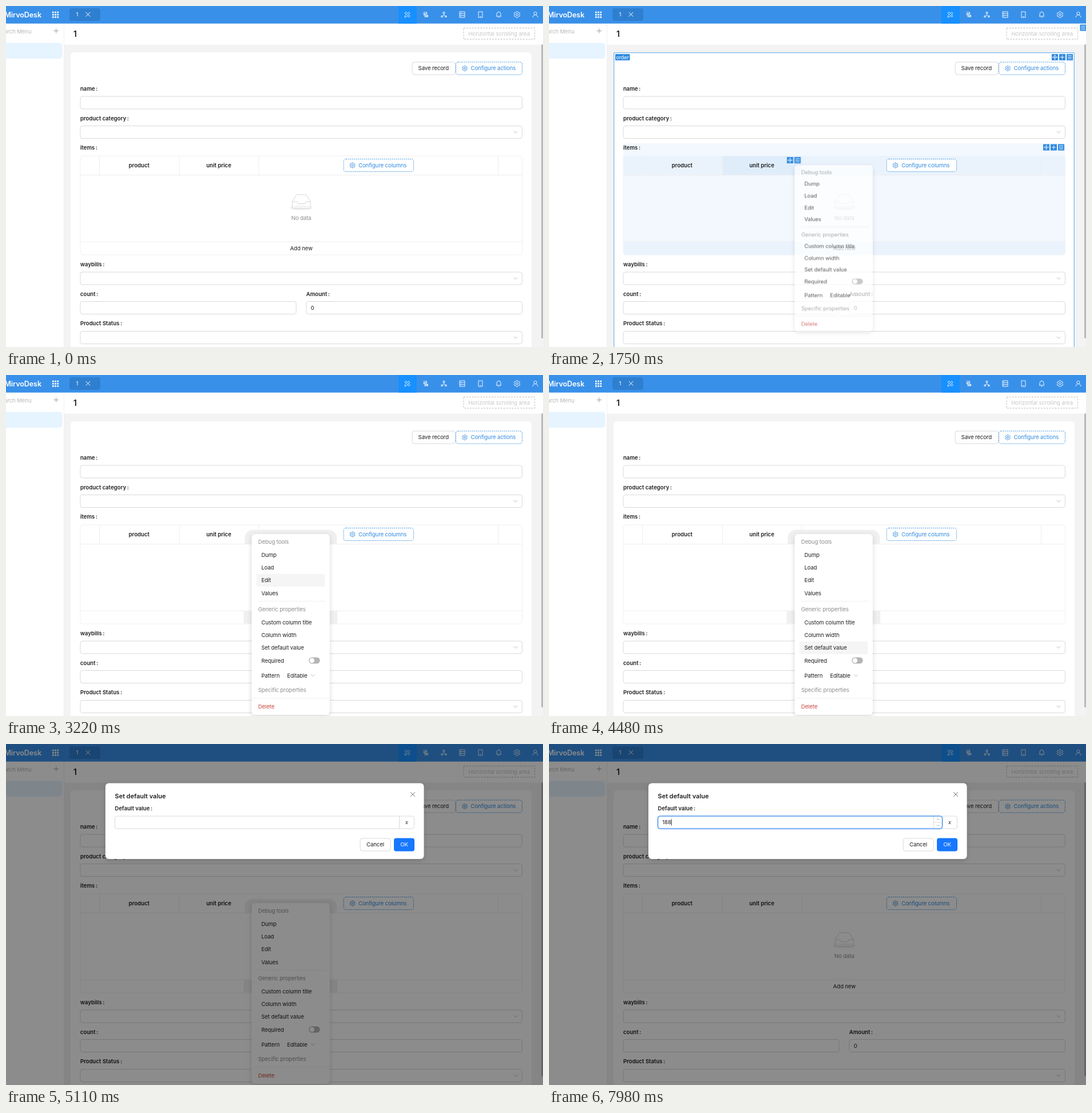
Recreate the animation shown at these times as an HTML page. Size 940 px wide and 596 px high, loop 8 s.

```html
<!DOCTYPE html>
<html lang="en">
<head>
<meta charset="utf-8">
<title>Form designer</title>
<style>
  html, body { margin: 0; width: 100%; height: 100%; overflow: hidden; background: #fff; }
  svg { display: block; width: 940px; height: 596px; }
  text { font: 9.6px Inter, "Open Sans", sans-serif; letter-spacing: -.1px; fill: #1f1f1f; white-space: pre; }
  .bold { font-weight: 600; letter-spacing: 0; }
</style>
</head>
<body>
<svg id="stage" viewBox="0 0 940 596"></svg>
<script>
const BLUE = '#2f8ae0', LINE = '#d9d9d9', SOFT = '#f0f0f0', GRAY = '#8c8c8c';

const rect = (x, y, w, h, fill, r = 0, extra = '') =>
  `<rect x="${x}" y="${y}" width="${w}" height="${h}" rx="${r}" fill="${fill}" ${extra}/>`;
const box = (x, y, w, h, stroke = LINE, extra = '') =>
  rect(x, y, w, h, '#fff', 4, `stroke="${stroke}" ${extra}`);
const path = (d, stroke, width = 1, extra = '') =>
  `<path d="${d}" fill="none" stroke="${stroke}" stroke-width="${width}" ${extra}/>`;
const text = (x, y, s, extra = '') => `<text x="${x}" y="${y}" ${extra}>${s}</text>`;
const mid = (x, y, s, extra = '') => text(x, y, s, `text-anchor="middle" ${extra}`);
const group = (id, body) => `<g id="${id}">${body}</g>`;
const at = (x, y, body) => `<g transform="translate(${x} ${y})">${body}</g>`;
const label = (x, y, s) => text(x, y, `${s}<tspan dx="1.6">:</tspan>`, 'class="bold"');
const cross = (x, y, r, color) => path(`M${x - r} ${y - r}l${2 * r} ${2 * r}m0 ${-2 * r}l${-2 * r} ${2 * r}`, color);
const chevron = (x, y, r = 3.4) => path(`M${x - r} ${y - r / 2}l${r} ${r}l${r} ${-r}`, '#b5b5b5', .9);
const select = y => box(130, y, 773.5, 22) + chevron(892, y + 11);

function gear(x, y, color, r = 4) {
  const ring = Array.from({ length: 24 }, (_, i) => {
    const a = (i - .5) * Math.PI / 12, k = r * (i % 4 < 2 ? 1.14 : .9);
    return `${(x + k * Math.sin(a)).toFixed(2)} ${(y - k * Math.cos(a)).toFixed(2)}`;
  });
  return path(`M${ring.join('L')}Z`, color, .9, 'stroke-linejoin="round"') +
    `<circle cx="${x}" cy="${y}" r="${r * .4}" fill="none" stroke="${color}" stroke-width=".9"/>`;
}

const dashedButton = (x, y, w, s) =>
  box(x, y, w, 22, '#4a9ae4', 'stroke-dasharray="2.1 1.4"') + gear(x + 15.5, y + 11, BLUE) +
  text(x + 26, y + 14.4, s, `style="fill:${BLUE}"`);

// Small designer handles
const HANDLES = {
  move: 'M5.5 1.8V9.2M1.8 5.5H9.2M4.3 2.8l1.2-1.2l1.2 1.2M4.3 8.2l1.2 1.2l1.2-1.2M2.8 4.3l-1.2 1.2l1.2 1.2M8.2 4.3l1.2 1.2l-1.2 1.2',
  add: 'M5.5 1.8V9.2M1.8 5.5H9.2',
  menu: 'M1.8 2.7H9.2M1.8 5.5H9.2M1.8 8.3H9.2'
};
const handles = (x, y, ...names) => names.map((n, i) =>
  at(x + i * 13, y, rect(0, 0, 11, 11, BLUE) + path(HANDLES[n], '#fff', .9))).join('');

function topBar() {
  const icons = [
    'M-4.5 4.5l.6-2.6L2.5-4.3l2 2L-2 4.1zM-2.2-.4L-4.5-2.6l2-2l2.2 2.2M.4 2.2l2.2 2.3l2-2L2.3.2',
    'M-4-4H2V-1H-3V1H4V4H-2M-4-1.5H2M-2 2.5H4',
    'M0-1.5V.5L-3 3M0 .5L3 3M-1.3-4.5h2.6v2.8h-2.6zM-4.6 2.2h2.4v2.2h-2.4zM2.2 2.2h2.4v2.2h-2.4z',
    'M-4.5-5H4.5V5H-4.5zM-4.5-1.7H4.5M-4.5 1.7H4.5M-2.8-3.3h1M-2.8 0h1M-2.8 3.3h1',
    'M-3.5-5H3.5V5H-3.5zM-1 3.3H1',
    'M-4.5 3H4.5M-3.5 3V-1a3.5 3.5 0 0 1 7 0V3M-1.2 4.8H1.2M0-4.5V-5.5',
    '',
    'M-4.5 5a4.5 4.5 0 0 1 9 0M-2.6-2a2.6 2.6 0 1 0 5.2 0a2.6 2.6 0 1 0-5.2 0'
  ];
  let out = rect(0, 0, 940, 30.7, '#3990e9') + rect(687, 0, 32, 30.7, '#1890ff') +
    text(62, 19.5, 'MirvoDesk', 'text-anchor="end" style="font-size:12.6px;font-weight:600;fill:#fff"') +
    rect(111, 4, 54, 22, '#2f7fd0', 4) + mid(124.3, 18.3, '1', 'style="fill:#fff"') + cross(143.5, 14.7, 3.8, '#fff');
  for (let i = 0; i < 9; i++)
    out += rect(81 + i % 3 * 4.2, 9.7 + Math.floor(i / 3) * 4.2, 2.7, 2.7, '#fff');
  icons.forEach((d, i) => {
    out += i === 6 ? gear(894.5, 15, '#fff', 4.8) : at(702.5 + i * 32, 15, path(d, '#fff', .9));
  });
  return out;
}

function sidebar() {
  return rect(0, 30, 102, 566, '#fff') + path('M101.5 30V596', SOFT) +
    text(44.5, 48, 'Search Menu', 'text-anchor="end" style="fill:#b8b8b8"') +
    path('M83.5 43.5h8.5M87.75 39.2v8.5', '#999', .9) +
    rect(-6, 64.5, 104.5, 27.5, '#e6f4ff', 5);
}

function pageHead() {
  return rect(102, 30, 838, 37.5, '#fff') + text(118, 53.5, '1', 'class="bold" style="font-size:14px"') +
    rect(801, 38.5, 124.5, 19.5, '#fff', 0, 'stroke="#cdcdcd" stroke-width="1.3" stroke-dasharray="2.8 2.1"') +
    mid(863.2, 51.7, 'Horizontal scrolling area', 'style="fill:#c8c8c8"');
}

const emptyState =
  '<ellipse cx="517" cy="352.5" rx="20.5" ry="4.3" fill="#000" fill-opacity=".045"/>' +
  path('M501 342l6.4-10.8q.9-1.4 2.4-1.4h14.4q1.5 0 2.4 1.4L533 342', '#d5d5d5') +
  path('M501 342h7.5q1.3 0 1.3 1.3q0 2.2 2 2.2h10.4q2 0 2-2.2q0-1.3 1.3-1.3H533V352.5q0 1.8-1.8 1.8H502.8q-1.8 0-1.8-1.8z', '#d5d5d5') +
  mid(517, 374, 'No data', `style="fill:${GRAY}"`);

function table() {
  return rect(130, 262, 773.5, 173, '#fff', 5, `stroke="${SOFT}"`) +
    group('tint', rect(130, 240, 773.5, 195, '#f2f8fe', 5) + rect(130, 262, 773.5, 33.5, '#eaf3fc', 4) +
      rect(130, 412, 773.5, 23, '#eaf3fc', 4) + rect(303.5, 262, 139, 33.5, '#dfedfb')) +
    group('bands', rect(130, 262, 773.5, 33.5, '#000', 4) + rect(130, 412, 773.5, 23, '#000', 4)) +
    path('M163.5 262V295.5M303.5 262V295.5M442.5 262V295.5M861.5 262V295.5M130 295.5H903.5M130 412H903.5', '#ededed', .9) +
    label(130, 251.3, 'items') +
    mid(233, 282.2, 'product', 'class="bold"') + mid(372.5, 282.2, 'unit price', 'class="bold"') +
    dashedButton(591, 267.5, 122.5, 'Configure columns') +
    emptyState + mid(517, 427.2, 'Add new');
}

function form() {
  return rect(113, 81, 807, 530, '#fff', 6) +
    box(711, 98, 75.5, 22) + mid(748.3, 112.4, 'Save record') +
    dashedButton(787.5, 98, 116, 'Configure actions') +
    label(130, 148, 'name') + box(130, 158, 773.5, 22) +
    label(130, 199.7, 'product category') + select(209.5) +
    table() +
    label(130, 455, 'waybills') + select(465) +
    label(130, 506.8, 'count') + box(130, 516.5, 378, 22) +
    label(525.5, 506.8, 'Amount') + box(525.5, 516.5, 378, 22) + text(533.5, 531.2, '0') +
    label(130, 558.3, 'Product Status') + select(568.5);
}

const designer = rect(113.7, 81.7, 805.6, 530, 'none', 1, 'stroke="#7ab8ef" stroke-width="1.3"') +
  rect(116, 84, 25.5, 11, BLUE, 1) + mid(128.6, 92.6, 'order', 'style="fill:#fff;font-size:9px"') +
  handles(880, 84, 'move', 'add', 'menu') + handles(865, 241.5, 'move', 'add', 'menu') +
  handles(416.5, 264, 'move', 'menu') + handles(929.5, 32.5, 'menu');

const ROWS = {
  Dump: 314, Load: 336.4, Edit: 358.7, Values: 381.1, 'Custom column title': 432,
  'Column width': 454.4, 'Set default value': 476.8, Required: 499, Pattern: 525
};
const heading = (y, s) => text(441.5, y, s, `style="fill:${GRAY}"`);

function menu() {
  return group('halo', rect(418, 270.5, 161, 200, SOFT, 14, 'clip-path="url(#head)"') +
      rect(416, 412.5, 164, 22, SOFT)) +
    rect(430, 278, 136.5, 316, '#fff', 6, 'filter="url(#shadow)"') +
    rect(438.5, 0, 119.5, 22.4, '#f5f5f5', 3, 'id="hover"') +
    heading(295.4, 'Debug tools') + heading(413.3, 'Generic properties') + heading(554.3, 'Specific properties') +
    Object.entries(ROWS).map(([s, y]) => text(447, y + 3.5, s)).join('') +
    path('M441.5 395.3H560M430 565H566', SOFT) +
    rect(530, 493.5, 19.5, 11, '#b5b5b5', 5.5) + '<circle cx="535.6" cy="499" r="4.3" fill="#fff"/>' +
    text(492, 528.5, 'Editable') + chevron(537.5, 525) +
    text(441.5, 583, 'Delete', 'style="fill:#c9463d"');
}

function modal() {
  return rect(174, 68.5, 557.5, 132.5, '#fff', 6, 'filter="url(#shadow)"') +
    text(190.5, 94.7, 'Set default value', 'class="bold" style="font-size:11px"') +
    cross(712, 88, 4, '#777') + label(190.5, 116, 'Default value') +
    box(190.5, 126, 524, 22) + path('M688.5 126V148', LINE) +
    mid(701.3, 140, 'x', 'style="font:italic 9.5px \'Noto Serif\',serif"') +
    group('focus', rect(190.5, 126, 498, 22, '#fff', 4, 'stroke="#d6e8ff" stroke-width="3"') +
      path('M673.5 126V148M673.5 137H688.5', LINE, .9) +
      path('M679 132.7l2-2l2 2M679 141.3l2 2l2-2', GRAY, .8) +
      rect(190.5, 126, 498, 22, 'none', 4, 'stroke="#2f86e6"')) +
    text(198.3, 140.4, '', 'id="value"') + rect(0, 131.5, .9, 11, '#222', 0, 'id="caret"') +
    box(620, 165, 53, 22) + mid(646.5, 179.4, 'Cancel') +
    rect(679, 164.5, 36, 23, '#1677ff', 4) + mid(697, 179.4, 'OK', 'style="fill:#fff"');
}

const stage = document.getElementById('stage');
stage.innerHTML = `<defs>
    <clipPath id="head"><rect x="400" y="262" width="200" height="33"/></clipPath>
    <filter id="shadow" x="-15%" y="-20%" width="130%" height="140%">
      <feDropShadow dx="0" dy="2.5" stdDeviation="4.5" flood-opacity=".16"/></filter>
  </defs>` +
  rect(0, 0, 940, 596, '#f3f3f3') + form() + pageHead() + sidebar() + topBar() +
  rect(937, 67, 4, 514, '#b9b9b9', 2) +
  group('designer', designer) + group('menu', menu()) +
  rect(0, 0, 940, 596, '#000', 0, 'id="mask"') + group('modal', modal());

const el = id => document.getElementById(id);
const set = (id, attrs) => Object.entries(attrs).forEach(([k, v]) => el(id).setAttribute(k, v));
const fade = (id, opacity) => set(id, { opacity: Number(opacity) });
const ramp = (t, from, to) => Math.min(1, Math.max(0, (t - from) / (to - from)));
const lastOf = (t, steps) => steps.reduce((v, [start, s]) => t >= start ? s : v, '');

const HOVERS = [[2590, 'Load'], [3220, 'Edit'], [3780, 'Values'], [3920, 'Custom column title'],
  [4270, 'Column width'], [4480, 'Set default value'], [5040, '']];
const TYPING = [[7210, '1'], [7770, '18'], [7980, '188']];

function draw(now) {
  const t = Math.floor(now % 8000 / 70) * 70;

  const hovering = t >= 770 && t < 2240;
  fade('designer', hovering);
  fade('tint', hovering);

  const opening = ramp(t, 1680, 1820), closing = ramp(t, 5110, 5310) ** 5;
  const scaleY = (.84 + .16 * opening) * (1 - .2 * closing);
  set('menu', {
    opacity: opening < 1 ? opening * 1.45 : 1 - closing,
    transform: `translate(0 278) scale(1 ${scaleY}) translate(0 -278)`
  });
  const row = lastOf(t, HOVERS);
  set('hover', { opacity: row ? 1 : 0, y: (ROWS[row] || 0) - 11.2 });

  const zoom = ramp(t, 4970, 5110), zooming = zoom > 0 && zoom < 1;
  fade('halo', t >= 2240 && !zooming);
  fade('bands', zooming ? .045 : 0);
  fade('mask', .45 * Math.min(1, zoom * 1.45));
  set('modal', {
    opacity: Math.min(1, zoom * 1.93),
    transform: `translate(500 473) scale(${.834 + .166 * zoom}) translate(-500 -473)`
  });

  fade('focus', ramp(t, 6090, 6370));
  el('value').textContent = lastOf(t, TYPING);
  set('caret', { x: 198.5 + el('value').getComputedTextLength(), opacity: t >= 6160 ? 1 : 0 });
}

const start = performance.now();
function tick() {
  draw(performance.now() - start);
  requestAnimationFrame(tick);
}
tick();
</script>
</body>
</html>
```
